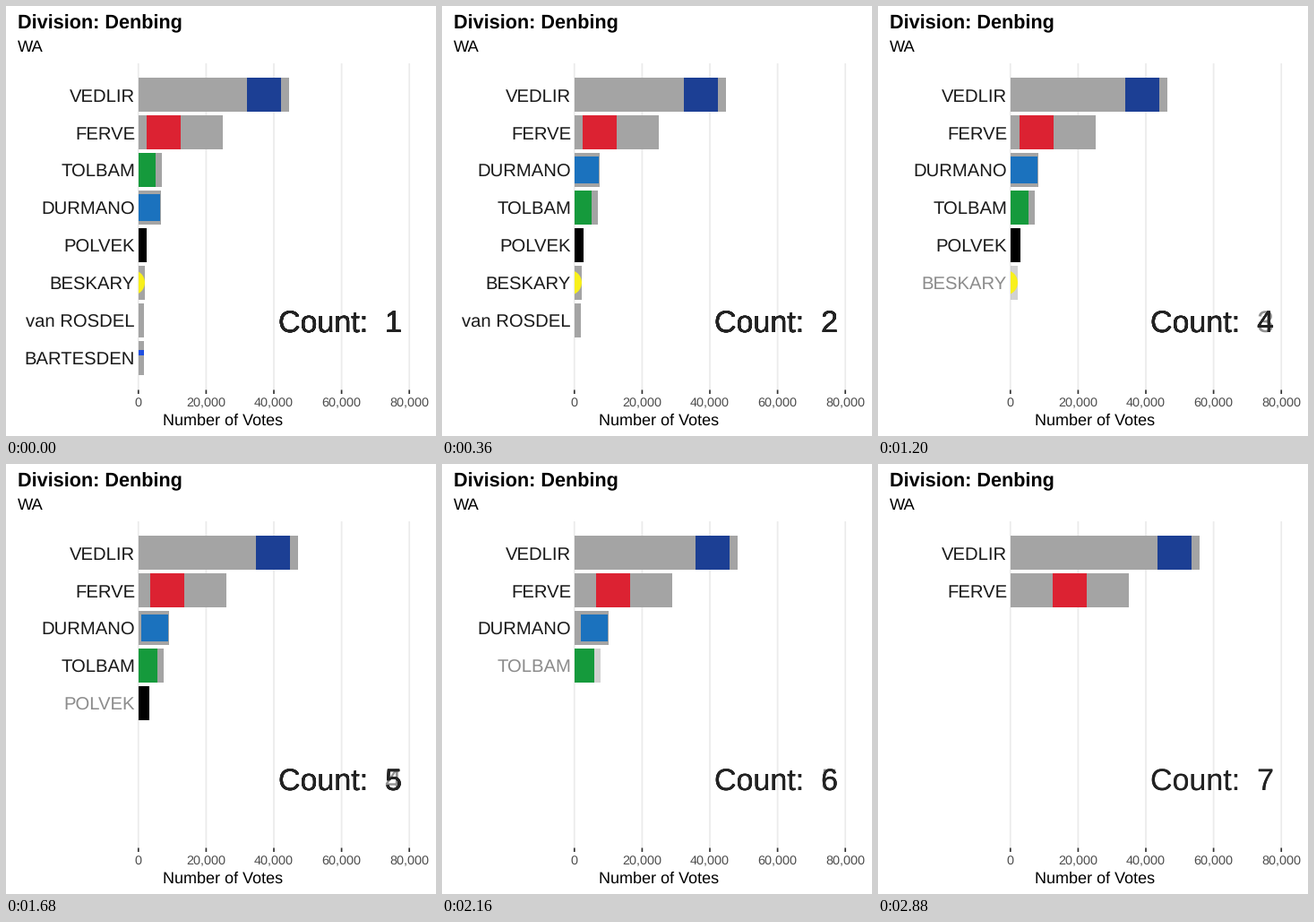
These frames come from a looping animation (480 by 480 pixels, 3 s). A matplotlib script:

```python
import matplotlib.pyplot as plt
from matplotlib.animation import FuncAnimation
from matplotlib.patches import Circle, Rectangle

SIZE, DPI = 480, 96
PT = 72 / DPI  # points per pixel
FRAMES, INTERVAL = 25, 120

ZERO, PX_PER_1000 = 147.8, 3.78
ROW_TOP, ROW_STEP, BAR_H = 99, 41.95, 37.8
INK, BAR = "#1a1a1a", "#a4a4a4"

plt.rcParams["font.family"] = "Liberation Sans"
plt.rcParams["text.hinting"] = "none"

fig = plt.figure(figsize=(SIZE / DPI, SIZE / DPI), dpi=DPI, facecolor="white")
ax = fig.add_axes([0, 0, 1, 1])
ax.set_xlim(0, SIZE)
ax.set_ylim(SIZE, 0)
ax.axis("off")

# name, row in each count (last one repeats), bar end in each count,
# badge: (shape, colour, side, gap to the bar end, vertical shift)
CANDIDATES = [
    ("VEDLIR", [0], [316, 317, 321, 325, 327, 333, 359],
     ("square", "#1c3f94", 38, 9, 0)),
    ("FERVE", [1], [242, 242.3, 243, 243.6, 247.5, 266, 280],
     ("square", "#dc2232", 38, 47, 0)),
    ("TOLBAM", [2, 3], [174, 174, 174.3, 175.4, 177],
     ("square", "#159a3c", 38, 7, 0)),
    ("DURMANO", [3, 2], [173, 176, 177, 180, 184, 187],
     ("square", "#1b72be", 30, 1, 0)),
    ("POLVEK", [4], [157, 158, 158.4, 159.5],
     ("square", "#000000", 38, 0, 0)),
    ("BESKARY", [5], [155, 156, 156],
     ("circle", "#f8f01c", 28, 0, 0)),
    ("van ROSDEL", [6], [154, 155], None),
    ("BARTESDEN", [7], [154],
     ("square", "#1f4fe0", 6, 0, -6)),
]


def text(x, y, s, size, color="black", **kw):
    return ax.text(x, y, s, fontsize=size * PT, color=color,
                   va="baseline", **kw)


def rule(x, top, bottom, color):
    ax.plot([x, x], [top, bottom], color=color, lw=1.7 * PT,
            solid_capstyle="butt", snap=False, zorder=1)


def draw_axes():
    text(13, 25, "Division: Denbing", 21.6, weight="bold")
    text(13, 51, "WA", 18.2)
    text(242, 468, "Number of Votes", 18, ha="center")
    for votes in range(0, 80001, 20000):
        x = ZERO + votes / 1000 * PX_PER_1000
        rule(x, 64, 428.5, "#ebebeb")
        rule(x, 428.5, 433, "#333333")
        text(x, 447, f"{votes:,}", 14.4, "#4d4d4d", ha="center")


def at(values, k):
    return values[min(k, len(values) - 1)]


def tween(values, k, u):
    return at(values, k) * (1 - u) + at(values, k + 1) * u


def draw_badge(badge, end, y):
    shape, color, side, gap, shift = badge
    right, mid = end - gap, y + shift
    if shape == "circle":
        patch = Circle((right - side / 2, mid), side / 2, fc=color, lw=0)
    else:
        patch = Rectangle((right - side, mid - side / 2), side, side,
                          fc=color, lw=0)
    patch.set_zorder(3)
    ax.add_patch(patch)
    patch.set_clip_path(Rectangle((ZERO, 60), 320, 370,
                                  transform=ax.transData))
    return patch


def draw_candidate(cand, k, u):
    name, rows, ends, badge = cand
    alpha = 1 - u if k + 1 >= len(ends) else 1
    y = ROW_TOP + ROW_STEP * tween(rows, k, u)
    end = tween(ends, k, u)
    bar = Rectangle((ZERO, y - BAR_H / 2), end - ZERO, BAR_H, fc=BAR, lw=0,
                    alpha=alpha, zorder=2)
    ax.add_patch(bar)
    parts = [bar, text(144, y + 8, name, 20.3, INK, ha="right",
                       alpha=alpha)]
    if badge:
        parts.append(draw_badge(badge, end, y))
    return parts


def draw_count(number, alpha=1):
    return text(304, 364.4, f"Count:  {number}", 34, "#222222",
                alpha=alpha, zorder=5)


def state(i):
    """Count index and progress: hold, hold, halfway, arrived."""
    k, step = divmod(i, 4)
    return (k + 1, 0) if step == 3 else (k, 0.5 if step == 2 else 0)


shown = []


def update(i):
    while shown:
        shown.pop().remove()
    k, u = state(i)
    for cand in CANDIDATES:
        last = len(cand[2]) - 1
        if k > last:
            continue
        shown.extend(draw_candidate(cand, k, u))
        # every candidate carries its own copy of the counter
        if u and k == last:
            shown.append(draw_count(k + 1, 1 - u))
        else:
            shown.append(draw_count(k + 2 if u else k + 1))
    return shown


draw_axes()
anim = FuncAnimation(fig, update, frames=FRAMES, interval=INTERVAL,
                     init_func=lambda: update(0), repeat=True,
                     repeat_delay=0, blit=False)
plt.show()
```
